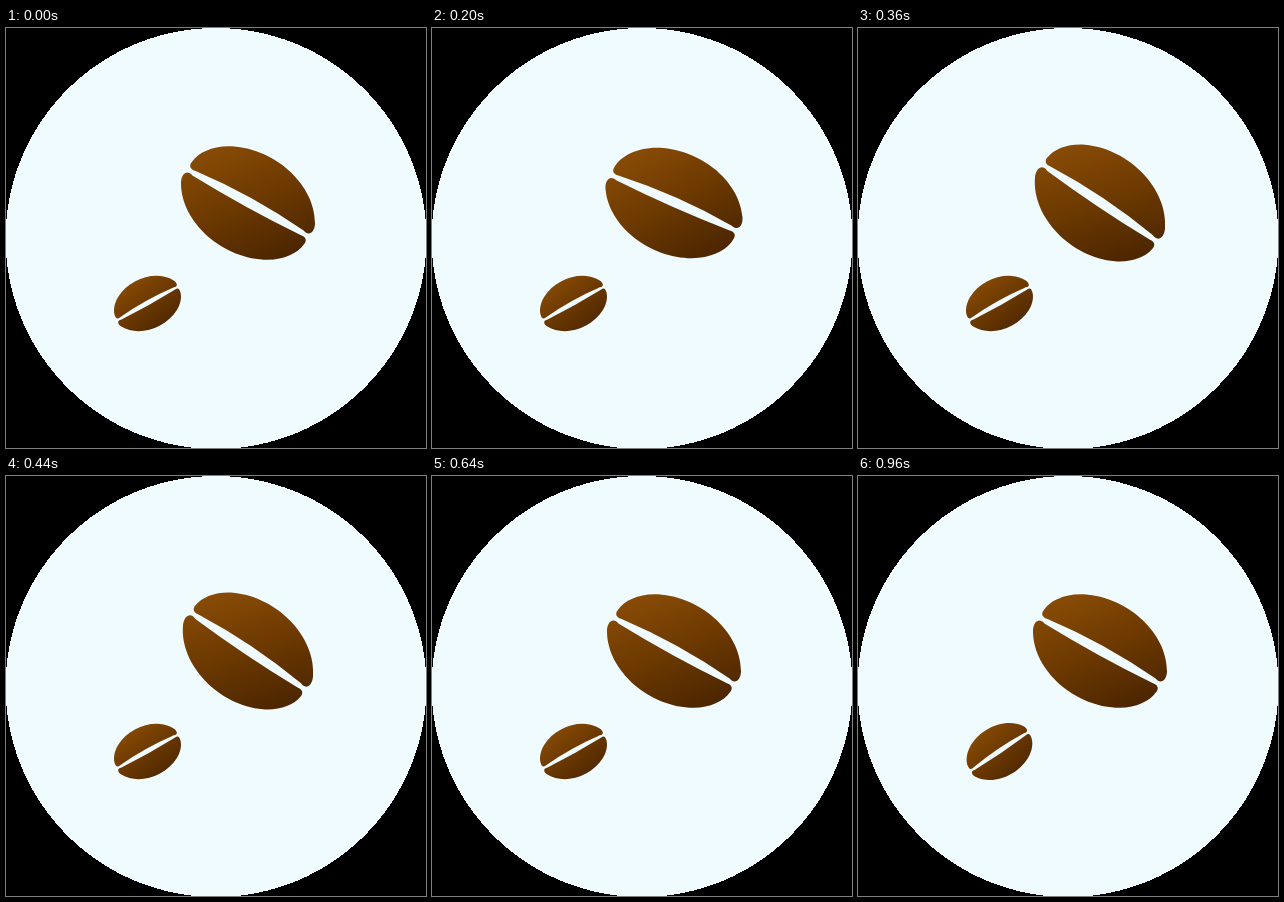
Animation of 420 by 420 pixels, one loop 1 s. Source, as an HTML page:

```html
<!DOCTYPE html>
<html lang="en">
<head>
<meta charset="utf-8">
<title>Coffee beans</title>
<style>
  html, body { margin: 0; height: 100%; overflow: hidden; background: #000; }
  svg { display: block; width: 100vw; height: 100vh; }
</style>
</head>
<body>
<svg viewBox="0 0 420 420">
  <defs>
    <linearGradient id="brown" gradientUnits="userSpaceOnUse" x1="-60" x2="60">
      <stop offset="0" stop-color="#864a06"/>
      <stop offset=".5" stop-color="#6c3900"/>
      <stop offset="1" stop-color="#4e2700"/>
    </linearGradient>
    <linearGradient id="bigFill" href="#brown" gradientTransform="rotate(38)"/>
    <linearGradient id="smallFill" href="#brown" gradientTransform="rotate(82)"/>
    <path id="bean" d="
      M62-2.8Q0-9-62-2.5C-67-1.5-70-4-69-9C-68-20-59-32-45-40C-6.5-61.3 48.9-50 68.3-15C73-6 69 0 62-2.8Z
      M-62 2.8Q0 5.5 62 2.5C67 1.5 70 4 69 9C68 20 59 32 45 40C6.5 61.3-48.9 50-68.3 15C-73 6-69 0-62 2.8Z"/>
  </defs>
  <circle cx="210" cy="210.5" r="210.5" fill="#f0fbff" shape-rendering="crispEdges"/>
  <use id="big" href="#bean" fill="url(#bigFill)"/>
  <use id="small" href="#bean" fill="url(#smallFill)"/>
</svg>
<script>
  const LOOP = 1000, STEP = 40, PERIOD = 320, SWING = 10;
  const big = document.getElementById('big');
  const small = document.getElementById('small');

  // Triangle wave: 0, +SWING, 0, -SWING, 0 over one period
  function wobble(ms) {
    const p = (ms / PERIOD + 0.25) % 1;
    return SWING * (1 - Math.abs(4 * p - 2));
  }

  function place(bean, x, y, angle, scale) {
    const flip = Math.sign(scale);
    bean.setAttribute('transform',
      `translate(${x} ${y}) rotate(${angle}) scale(${scale} ${flip * scale})`);
  }

  function draw(ms) {
    const t = Math.floor((ms % LOOP + 1) / STEP) * STEP % LOOP;
    // The wave starts at its trough side, so the sign is reversed
    place(big, 242, 175, 29 - (t < 640 ? -wobble(t) : 0), 1);
    place(small, 141.5, 275.5, -29 - (t > 680 ? -wobble(t - 680) : 0), 0.5);
  }

  let start;
  function tick(now) {
    start ??= now;
    draw(now - start);
    requestAnimationFrame(tick);
  }
  draw(0);
  requestAnimationFrame(tick);
</script>
</body>
</html>
```
